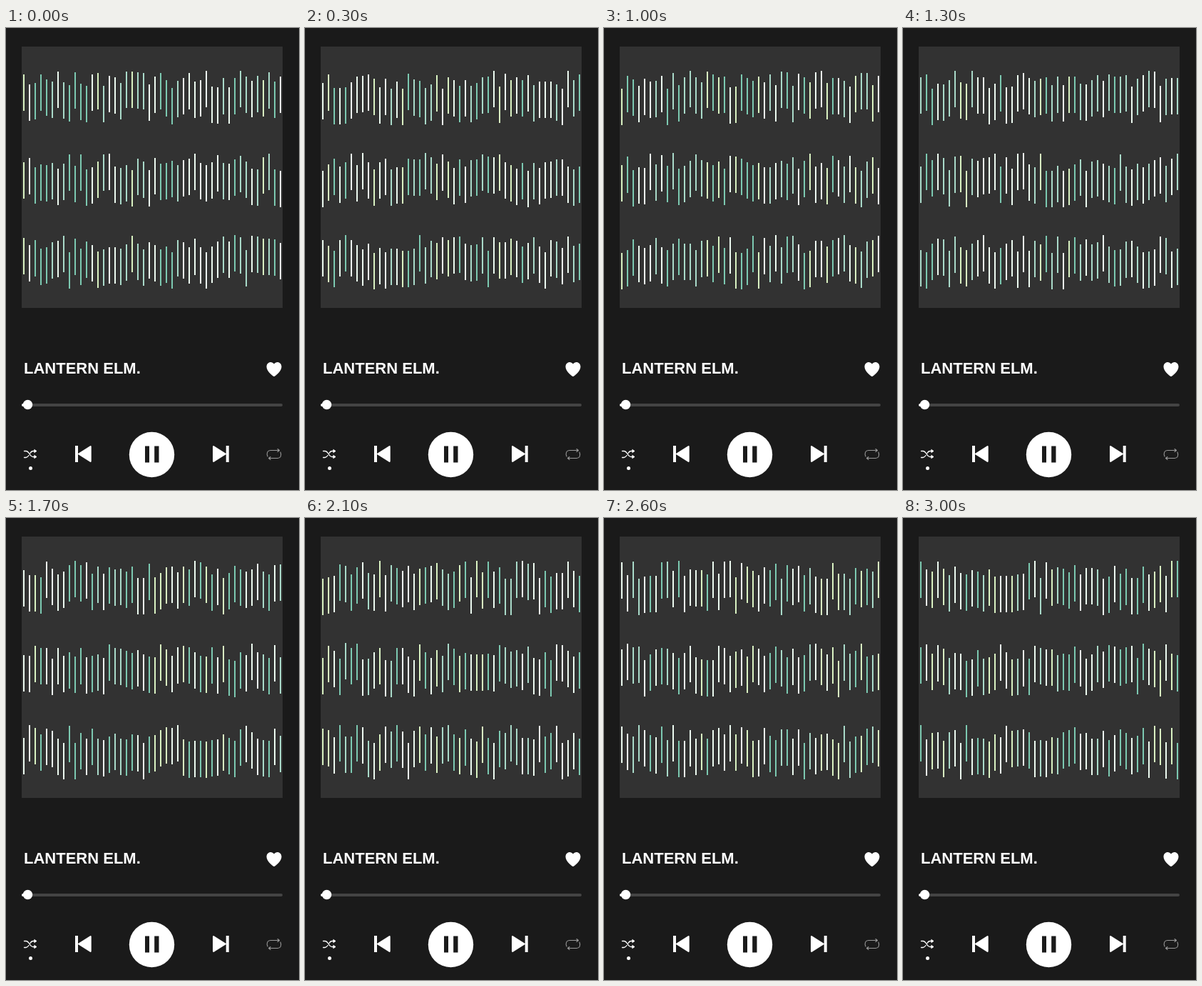
Animation, 411 px wide and 647 px high, one loop 3100 ms. Source, as an HTML page:

```html
<!DOCTYPE html>
<html lang="en">
<head>
<meta charset="utf-8">
<title>Music player</title>
<style>
  html, body { margin: 0; height: 100%; overflow: hidden; background: #1a1a1a; }
  svg { display: block; width: 100vw; height: 100vh; }
  text { font: bold 22px "Liberation Sans", Arial, sans-serif; fill: #fff; }
  .line { fill: none; stroke-linecap: round; stroke-linejoin: round; }
</style>
</head>
<body>
<svg viewBox="0 0 411 647">
  <rect x="22" y="26" width="366" height="366" fill="#323232"/>
  <g id="bars" fill="none" stroke-width="2"></g>

  <text x="25" y="484">LANTERN ELM.</text>
  <path fill="#fff" d="M376 488C374.500 488 365.500 480.500 365.500 474.500C365.500 467.500 373 466 376 470.500C379 466 386.500 467.500 386.500 474.500C386.500 480.500 377.500 488 376 488Z"/>

  <rect x="22" y="526" width="366" height="4" rx="2" fill="#444"/>
  <rect x="22" y="526" width="9" height="4" rx="2" fill="#fff"/>
  <circle cx="30.500" cy="527.500" r="6.700" fill="#fff"/>

  <g class="line" stroke="#fff" stroke-width="1.300">
    <path d="M25.500 592.500H28C33 592.500 33 600.500 38 600.500H41M25.500 601.500H28C30 601.500 31 600 32 598.500M34 595.500C35 593.500 36 592.500 38 592.500H41"/>
    <path fill="#fff" stroke-width=".8" d="M40 590.500L43 592.500L40 594.500ZM40 598.500L43 600.500L40 602.500Z"/>
  </g>
  <circle cx="34.500" cy="616.500" r="2.500" fill="#fff"/>

  <defs>
    <path id="skip" d="M97 585H101V596L118 585.200Q119.700 584.500 119.700 586.500V606.500Q119.700 608.500 118 607.800L101 597V608H97Z"/>
  </defs>
  <use href="#skip" fill="#fff"/>
  <use href="#skip" fill="#fff" transform="matrix(-1 0 0 1 409.700 0)"/>

  <circle cx="204.500" cy="597.500" r="31.700" fill="#fff"/>
  <path fill="#1a1a1a" d="M195 585.500h6v23h-6zM208.200 585.500h6.300v23h-6.300z"/>

  <g class="line" stroke="#999" stroke-width="1.100">
    <path d="M367 600C365 595 367 591.500 371 591.500H383M385 594C387 599 385 602.500 381 602.500H369"/>
    <path d="M381 589.500L383.500 591.500L381 593.500M371 600.500L368.500 602.500L371 604.500"/>
  </g>
</svg>
<script>
const LOOP = 3100, STEP = 100, COLUMNS = 46, ROWS = 3;
const WHITE = '#ecfaf0';
const COLORS = [WHITE, '#7cc9b1', '#a9dac9', '#d9f2c2', WHITE];

const bars = document.getElementById('bars');
const paths = COLORS.map(color => {
  const path = document.createElementNS('http://www.w3.org/2000/svg', 'path');
  path.setAttribute('stroke', color);
  return bars.appendChild(path);
});

function seededRandom(seed) {
  return () => {
    seed = (seed + 0x6D2B79F5) | 0;
    let n = Math.imul(seed ^ (seed >>> 15), seed | 1);
    n ^= n + Math.imul(n ^ (n >>> 7), n | 61);
    return ((n ^ (n >>> 14)) >>> 0) / 2 ** 32;
  };
}

// Each column has one colour; its three bars get independent heights.
function drawBars(step) {
  const random = seededRandom(step * 7919 + 17);
  const shapes = COLORS.map(() => '');
  for (let column = 0; column < COLUMNS; column++) {
    const color = Math.floor(random() * COLORS.length);
    for (let row = 0; row < ROWS; row++) {
      const top = 60 + row * 115 + Math.floor(random() * 26);
      shapes[color] += `M${25 + column * 8} ${top}v51`;
    }
  }
  paths.forEach((path, i) => path.setAttribute('d', shapes[i]));
}

// The first pose holds for two steps.
let shown = -1;
function tick() {
  const step = Math.max(0, Math.floor(performance.now() % LOOP / STEP) - 1);
  if (step !== shown) drawBars(shown = step);
  requestAnimationFrame(tick);
}
tick();
</script>
</body>
</html>
```
